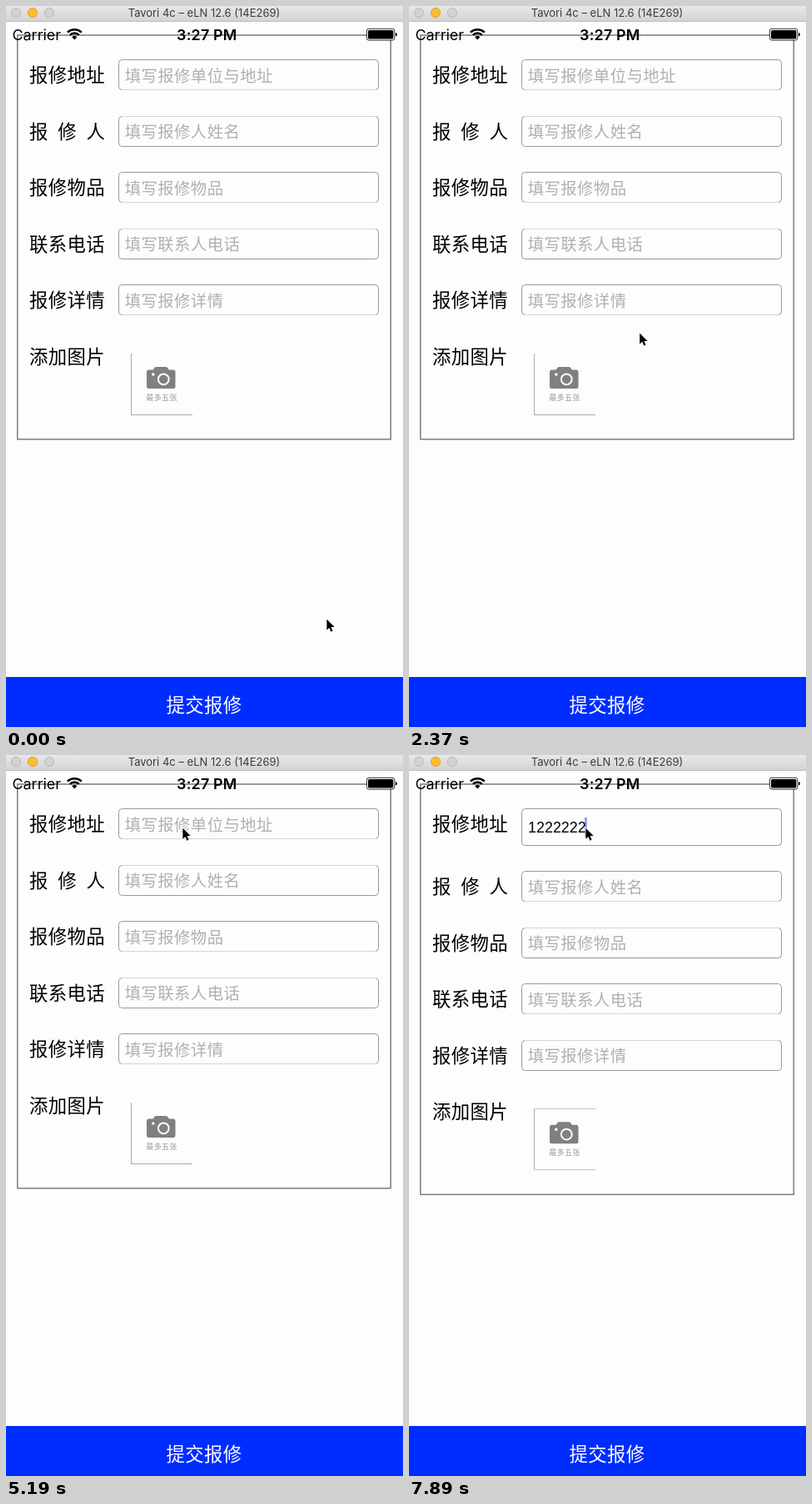
An HTML page for the animation above (8 s loop, 477 by 865 pixels).

```html
<!DOCTYPE html>
<html lang="zh">
<head>
<meta charset="utf-8">
<title>报修</title>
<style>
  html, body { margin: 0; width: 100%; height: 100%; overflow: hidden; background: #fdfdfd; }
  svg { display: block; }
  text { font-family: "Noto Sans CJK SC", "Noto Sans CJK", sans-serif; white-space: pre; }
  .label { font-size: 22.4px; letter-spacing: .4px; }
  .hint { font-size: 19.4px; letter-spacing: .4px; fill: #b0b0b0; }
  .tiny { font-size: 9px; letter-spacing: .4px; fill: #999; }
  .ui { font-family: Inter, Roboto, sans-serif; }
  .typed { font: 17.93px "Liberation Sans", Arial, sans-serif; }
</style>
</head>
<body>
<svg width="477" height="865" viewBox="0 0 477 865">
  <defs>
    <linearGradient id="bar" x2="0" y2="1">
      <stop stop-color="#e8e8e8"/><stop offset="1" stop-color="#d2d2d2"/>
    </linearGradient>
  </defs>
  <rect width="477" height="865" fill="#fdfdfd"/>
  <g id="form"></g>
  <rect id="caret" y="75" width="3" height="23" fill="#486ade"/>
  <text id="typed" class="typed" x="143" y="93.3"></text>

  <rect width="477" height="19" fill="url(#bar)"/>
  <rect y="18" width="477" height="1" fill="#bdbdbd"/>
  <g fill="#d2d2d2" stroke="#b9b9b9">
    <circle cx="12" cy="8" r="5.6"/>
    <circle cx="32" cy="8" r="5.6" fill="#fdbd2f" stroke="#dfa12b"/>
    <circle cx="52" cy="8" r="5.6"/>
  </g>
  <text class="ui" x="238" y="13" font-size="13" text-anchor="middle" fill="#3c3c3c">Tavori 4c – eLN 12.6 (14E269)</text>

  <text class="ui" x="7.5" y="41" font-size="17.9">Carrier</text>
  <text class="ui" x="241.3" y="41" font-size="17.9" font-weight="600" letter-spacing=".2" text-anchor="middle">3:27 PM</text>
  <g id="wifi" fill="none" stroke="#000" stroke-width="2.5"></g>
  <rect x="433.4" y="27.3" width="33.4" height="13.8" rx="2.6" fill="#fdfdfd" stroke="#000" stroke-width=".8"/>
  <rect x="435" y="28.9" width="30.3" height="10.6" rx="1.5"/>
  <path d="M468 32q2 .6 2 2.300t-2 2.300z"/>

  <rect y="805" width="477" height="60" fill="#002dff"/>
  <text class="label" x="192.5" y="846.5" fill="#fff" font-weight="300">提交报修</text>

  <path id="cursor" d="M0 0V13L3 10.200 5 15 7.200 14 5.200 9.400H9.300Z" stroke="#fff" stroke-width="1.3" paint-order="stroke"/>
</svg>
<script>
const $ = id => document.getElementById(id);
const LOOP = 8000, TICK = 148.6, LEAD = 22;   // the screen refreshes once per tick
const PITCH = 67.5, DIGIT = 10;

const rows = [
  ['报修地址', '填写报修单位与地址'],
  ['报修人', '填写报修人姓名'],
  ['报修物品', '填写报修物品'],
  ['联系电话', '填写联系人电话'],
  ['报修详情', '填写报修详情'],
  ['添加图片']
];

// pointer glides: first tick, last tick, end point
const start = [383, 734];
const glides = [
  [0, 6, 445, 811], [6, 8, 439, 817], [8, 9, 371, 705], [11, 13, 277, 398],
  [15, 19, 263, 352], [20, 22, 186, 214], [23, 27, 210, 86]
];
const focus = 29;
const presses = [36, 43, 44, 45, 46, 48, 50];

const clamp = v => Math.min(1, Math.max(0, v));
const ease = p => p * p * (3 - 2 * p);

function pointer(tick) {
  let [x, y] = start;
  for (const [from, to, tx, ty] of glides) {
    const p = ease(clamp((tick - from) / (to - from)));
    x += (tx - x) * p;
    y += (ty - y) * p;
  }
  return [x, y];
}

// solid after each press, then fades out
function caretAlpha(tick, count) {
  const age = tick - (count ? presses[count - 1] : focus);
  return age > 0 || count ? clamp((4 - age) * .6) : 0;
}

const line = (x1, y1, x2, y2, color) =>
  `<path d="M${x1} ${y1}L${x2} ${y2}" stroke="${color}"/>`;
const text = (cls, x, y, str) => `<text class="${cls}" x="${x}" y="${y}">${str}</text>`;

function field(i, shift, open) {
  const grown = open && i === 0;
  const y = Math.round(64 + i * PITCH + shift) + .5, h = grown ? 44 : 36;
  const paleY = (i + open) % 2 ? y : y + h;
  return `<rect x="135.5" y="${y}" width="312" height="${h}" rx="4" fill="none" stroke="#999"/>` +
    (grown ? '' : line(139, paleY, 444, paleY, '#d6d6d6'));
}

function photoBox(open) {
  const y = open ? 424.5 : 417.5, edge = open ? '#c4c4c4' : '#aaa';
  return line(150.5, y - .5, 150.5, y + 73.5, '#aaa') +
    line(150, y + 73, 224, y + 73, edge) +
    (open ? line(150, y, 224, y, edge) : '') +
    `<g transform="translate(169 ${open ? 440.3 : 433})" fill="#808080">
      <path d="M2.5 3.4H7.6L9.6 .8Q10.2 0 11.5 0H23Q24.3 0 24.900 .8L26.900 3.4H32Q34.500 3.4 34.500 6V23.5Q34.500 26 32 26H2.5Q0 26 0 23.5V6Q0 3.4 2.5 3.4Z"/>
      <circle cx="20.3" cy="14.8" r="6.4" stroke="#fdfdfd" stroke-width="2"/>
      <circle cx="7.8" cy="9" r="1.8" fill="#fdfdfd"/>
    </g>` + text('tiny', 168.3, open ? 480.3 : 472.5, '最多五张');
}

function form(open) {
  const drop = open ? 7.5 : 0;
  let out = `<rect x="13.75" y="35" width="448.5" height="${484.8 + drop}" fill="none" stroke="#7c7c7c" stroke-width="1.5"/>`;
  rows.forEach(([label, hint], i) => {
    const shift = i ? drop : 0, y = 91.3 + i * PITCH + shift;
    out += text('label', label.length === 3 ? '28 62.3 96.5' : 28, y, label);
    if (!hint) return;
    out += field(i, shift, open);
    if (i || !open) out += text('hint', 142.7, y - .4, hint);
  });
  return out + photoBox(open);
}

function wifi() {
  const cx = 82.3, cy = 40.6, dx = Math.sin(.76), dy = Math.cos(.76);
  const arc = r => `M${cx - r * dx} ${cy - r * dy}A${r} ${r} 0 0 1 ${cx + r * dx} ${cy - r * dy}`;
  return `<path d="${arc(12.3)}${arc(8)}"/><path d="${arc(4.6)}L${cx} ${cy}Z" fill="#000" stroke="none"/>`;
}

let wasOpen = null;

function draw() {
  const tick = Math.floor((performance.now() % LOOP + LEAD) / TICK);
  const count = presses.filter(p => p <= tick).length;
  const open = count > 0;
  const [x, y] = pointer(tick);
  if (open !== wasOpen) {
    $('form').innerHTML = form(open);
    wasOpen = open;
  }
  $('typed').textContent = '1222222'.slice(0, count);
  $('caret').setAttribute('x', 141 + DIGIT * count);
  $('caret').setAttribute('opacity', caretAlpha(tick, count));
  $('cursor').setAttribute('transform', `translate(${x + 2.4} ${y + 1.7})`);
  requestAnimationFrame(draw);
}

$('wifi').innerHTML = wifi();
draw();
</script>
</body>
</html>
```
